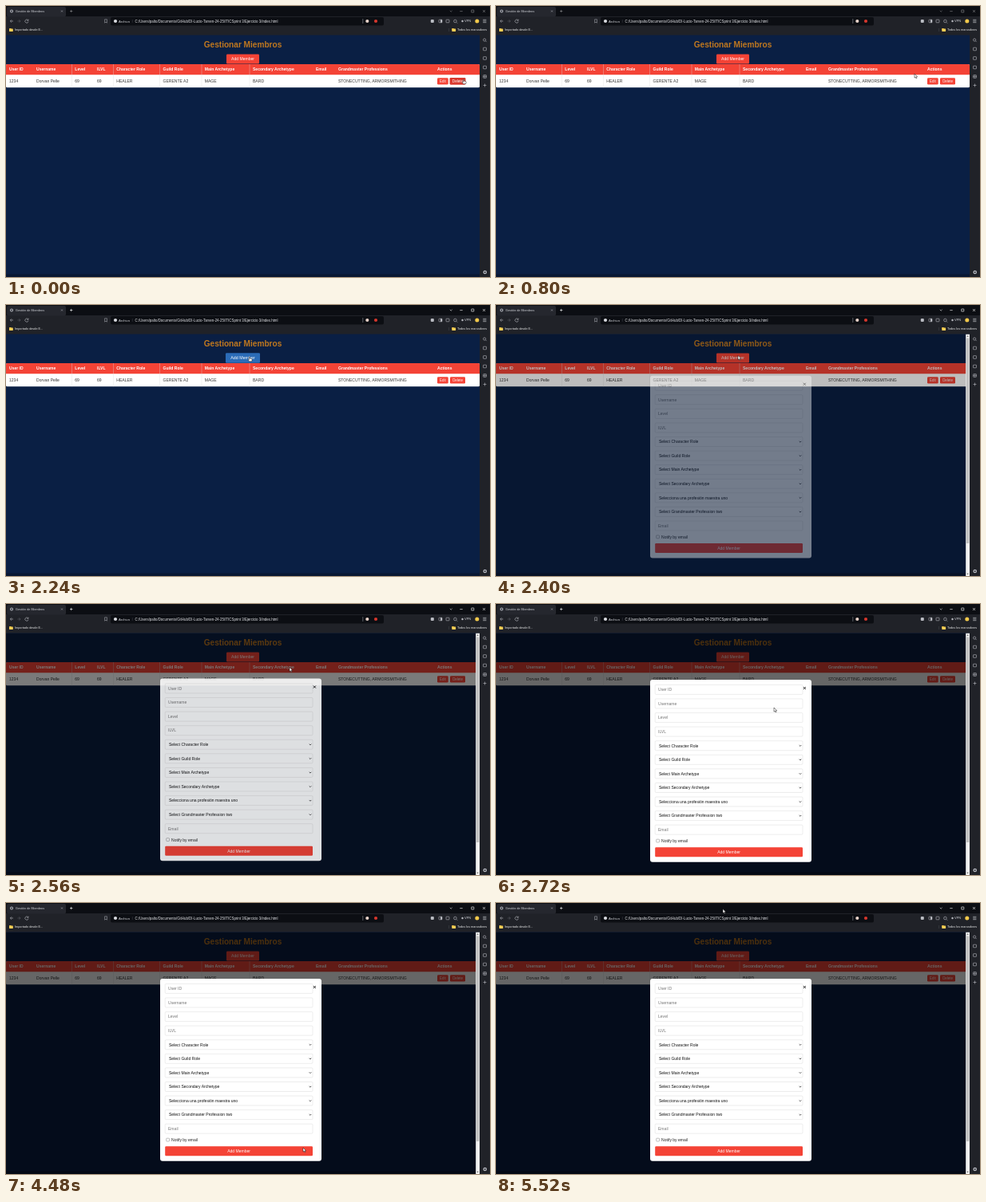
Recreate the animation shown at these times as an HTML page. Size 606 by 340 pixels, loop 5.6 s.

```html
<!DOCTYPE html>
<html lang="es">
<head>
<meta charset="utf-8">
<title>Gestión de Miembros</title>
<style>
  html, body { margin: 0; width: 100%; height: 100%; overflow: hidden; background: #0a1f44; }
  svg { display: block; width: 606px; height: 340px; font: 5.05px "Liberation Sans", Arial, sans-serif; }
  text { white-space: pre; }
</style>
</head>
<body>
<svg id="stage" viewBox="0 0 606 340"></svg>
<script>
const LOOP = 5600, STEP = 80, FOCUS = 2160, OPEN = 2280, OPEN_TIME = 420;
const RED = '#f44336';

const rect = (x, y, w, h, fill, extra = '') =>
  `<rect x="${x}" y="${y}" width="${w}" height="${h}" fill="${fill}" ${extra}/>`;
const dot = (x, y, r, fill) => `<circle cx="${x}" cy="${y}" r="${r}" fill="${fill}"/>`;
const line = (d, color = '#c8cad0', width = .6) =>
  `<path d="${d}" fill="none" stroke="${color}" stroke-width="${width}"/>`;
// Text is placed by its vertical centre.
const text = (s, x, y, fill, size = 5.05, extra = '') =>
  `<text x="${x}" y="${y + size * .36}" fill="${fill}" font-size="${size}" ${extra}>${s}</text>`;
const MID = 'text-anchor="middle"', BOLD = 'font-weight="bold"';

function button(id, label, x, y, w, h, size) {
  return `<g id="${id}">${rect(x, y, w, h, RED, 'rx="1.3"')}
    ${text(label, x + w / 2, y + h / 2, '#fff', size, MID)}</g>`;
}

function folder(x) {
  return rect(x, 28, 2.4, 2, '#e9b93a', 'rx=".4"') + rect(x, 28.6, 4.8, 3.4, '#f7cf55', 'rx=".4"');
}

function browser() {
  const icon = '#b9bbc2';
  const squares = [[544, 19], [553, 19], [599.5, 54], [599.5, 65.5], [599.5, 77], [599.5, 88.5]];
  return rect(0, 0, 606, 13, '#0c0e13') + rect(0, 13, 606, 23.5, '#202228') +
    rect(593, 36, 13, 304, '#202228') +
    rect(1, 1, 74, 12.5, '#25272e', 'rx="2"') +
    dot(7, 6.5, 2, '#aeb1b8') + dot(7, 6.5, .9, '#25272e') +
    text('Gestión de Miembros', 12, 6.5, '#d5d7dc', 3.8) +
    line('M69 5.5l2 2m0-2l-2 2', icon, .5) +
    `<g id="controls">${line('M80 6.5h3.4M81.7 4.8v3.4M555.8 5.8l1.4 1.4 1.4-1.4M568.3 6.6h3.4M582.8 5h3v3h-3zM597 5l3 3m0-3l-3 3', '#fff', .6)}</g>` +
    line('M9 19H5.4m1.6-1.7L5.3 19 7 20.7', icon) +
    line('M14.5 19H18m-1.6-1.7L18.1 19l-1.7 1.7', '#5c5f67') +
    line('M27.6 17.8a2.1 2.1 0 1 0 .4 1.8M28 16.6v1.7h-1.7', icon) +
    line('M123.6 16.8h2.8v4.4l-1.4-1.1-1.4 1.1z', icon, .5) +
    rect(131, 14, 342, 10.4, '#0c0e13', 'rx="2"') +
    dot(137, 19, 2.1, '#d8dadf') +
    text('Archivo', 141, 19, '#d8dadf', 4.2) + line('M158.3 17v4', '#4b4e56', .4) +
    text('C:/Users/palto/Documents/GitHub/DI-Lucio-Tarven-24-25/ITICSprint 3/Ejercicio 3/index.html',
      161.5, 19, '#e4e5e9', 4.42) +
    line('M446.8 16v6', '#a5a8af', .5) + dot(452.3, 19, 2.1, '#e9d3ca') + dot(463, 19, 2.1, '#d6372d') +
    rect(531.8, 17, 4, 4, icon, 'rx="1"') +
    squares.map(([x, y]) => rect(x - 2, y - 1.8, 4, 3.6, 'none', `rx=".5" stroke="${icon}" stroke-width=".6"`)).join('') +
    rect(544, 17.2, 2, 3.6, icon) + line('M599.5 86.7v3.6M597.5 88.5h4', icon, .5) +
    line('M564 20.5l1.2 1.2M560.6 19a1.8 1.8 0 1 0 3.6 0a1.8 1.8 0 1 0-3.6 0', icon) +
    dot(571.5, 19, 1.2, icon) + text('VPN', 574, 19, '#d5d7dc', 4) +
    dot(589.8, 19, 2.5, '#f2c94b') + line('M597.2 17.3h4.2M597.2 19h4.2M597.2 20.7h4.2', '#d5d7dc') +
    folder(4) + text('Importado desde E...', 11, 30, '#eceded', 3.8) +
    line('M554.5 28v4', '#4b4e56', .4) +
    folder(558.3) + text('Todos los marcadores', 565, 30, '#eceded', 3.8) +
    line('M597.5 42.5a1.6 1.6 0 1 0 3.2 0a1.6 1.6 0 1 0-3.2 0m2.8 1.2l1.4 1.4', icon) +
    line('M597.5 99.5h4m-2-2v4', icon) +
    dot(599.7, 334, 2.3, icon) + dot(599.7, 334, 1, '#202228');
}

function page() {
  const columns = [
    ['User ID', 4, '1234'], ['Username', 38, 'Dorvan Pelle'], ['Level', 86.3, '69'], ['ILVL', 114, '69'],
    ['Character Role', 138.3, 'HEALER'], ['Guild Role', 196.5, 'GERENTE A2'],
    ['Main Archetype', 248.8, 'MAGE'], ['Secondary Archetype', 309, 'BARD'], ['Email', 388, ''],
    ['Grandmaster Professions', 416, 'STONECUTTING, ARMORSMITHING'], ['Actions', 540, '']
  ];
  return rect(0, 36.5, 593, 303.5, '#0a1f44') + rect(0, 336.5, 593, 3.5, '#081733') +
    text('Gestionar Miembros', 296.5, 48.3, '#c0781f', 10.1, `${MID} ${BOLD}`) +
    button('add', 'Add Member', 276, 60.5, 41, 12, 5.05) +
    rect(0, 73, 593, 29.3, '#fff', 'rx="1.6"') +
    `<path d="M0 86.3V74.6q0-1.6 1.6-1.6H591.4q1.6 0 1.6 1.6V86.3z" fill="${RED}"/>` +
    line('M82.5 73v29.3M134.5 73v29.3M192.5 73v29.3M245 73v29.3M305 73v29.3', '#ddd', .35) +
    columns.map(([head, x, value]) =>
      text(head, x, 79.3, '#fff', 5.05, BOLD) + text(value, x, 94.3, '#333')).join('') +
    button('edit', 'Edit', 540, 90.2, 13.7, 8.3, 4.42) +
    button('delete', 'Delete', 556, 90.2, 19, 8.3, 4.42);
}

function dialog() {
  const fields = ['User ID', 'Username', 'Level', 'ILVL', 'Select Character Role', 'Select Guild Role',
    'Select Main Archetype', 'Select Secondary Archetype', 'Selecciona una profesión maestra uno',
    'Select Grandmaster Profession two', 'Email'];
  return rect(193, 95, 202, 228.7, '#fff', 'rx="3"') +
    fields.map((label, i) => {
      const y = 107.4 + i * 17.58, select = i > 3 && i < 10;
      return rect(199.2, y - 6, 184.8, 12, '#fff', 'rx="1.2" stroke="#ccc" stroke-width=".35"') +
        text(label, select ? 204 : 203, y, select ? '#111' : '#757575') +
        (select ? line(`M379.7 ${y - .6}l1.3 1.3 1.3-1.3`, '#111', .7) : '');
    }).join('') +
    line('M384.9 104l3 3m0-3l-3 3', '#111', .95) +
    rect(200.7, 295.2, 3.8, 3.8, '#fff', 'rx=".7" stroke="#666" stroke-width=".4"') +
    text('Notify by email', 207, 297.2, '#222') +
    button('submit', 'Add Member', 199.2, 305.2, 184.8, 12, 5.05);
}

const $ = id => document.getElementById(id);
$('stage').innerHTML = page() +
  `<g id="modal">
    ${rect(0, 36.5, 593, 303.5, '#000', 'id="shade"')}
    ${rect(588.2, 36.5, 4.8, 303.5, '#f1f1f1')}${rect(588.8, 41.5, 3.6, 257.5, '#c1c1c1')}
    <path d="M589.4 39.8l1.2-1.5 1.2 1.5zM589.4 336.8l1.2 1.5 1.2-1.5z" fill="#555"/>
    <g id="dialog">${dialog()}</g>
  </g>` + browser() +
  `<g id="cursor" fill="#fff" stroke="#000" stroke-width=".45" stroke-linejoin="round">
    <path id="arrow" d="M0 0V5.2L1.2 4.1 2 5.9 2.9 5.5 2.1 3.8H3.7Z"/>
    <path id="hand" d="M-.6 .3Q0-.4.6 .3V2.2L2.6 2.6Q3.3 2.8 3.2 3.6L2.7 5.7H-.5L-2 3.6Q-1.8 2.8-.6 3.5Z"/>
  </g>`;

// Pointer path: time, x, y
const path = [
  [0, 573, 92], [160, 572, 93], [480, 560, 95], [640, 544, 92], [800, 524, 85], [1040, 430, 79],
  [1280, 341, 78], [1520, 324, 72], [1840, 312, 67], [2240, 305, 65], [2400, 303, 63.5],
  [2560, 355, 79.5], [2720, 348, 130], [3040, 230, 215], [3520, 162, 237.5], [3680, 270, 290],
  [3840, 440, 328], [4000, 454, 310], [4240, 420, 306], [4480, 372, 307], [4640, 366, 285],
  [4880, 348, 160], [5120, 327, 60], [5360, 303, 22], [5520, 284, 7.5]
];

function pointer(t) {
  const last = path.length - 1;
  let i = path.findIndex(p => p[0] > t) - 1;
  if (i < 0) return path[last].slice(1);
  const a = path[i], b = path[i + 1], before = path[Math.max(0, i - 1)], after = path[Math.min(last, i + 2)];
  const span = b[0] - a[0], u = (t - a[0]) / span;
  return [1, 2].map(k => {
    const m = (b[k] - before[k]) / (b[0] - before[0]) * span;
    const n = (after[k] - a[k]) / (after[0] - a[0]) * span;
    return a[k] + u * (m + u * (3 * (b[k] - a[k]) - 2 * m - n + u * (2 * (a[k] - b[k]) + m + n)));
  });
}

function hover(id, over, color, x, y) {
  $(id).setAttribute('transform', over ? `translate(${x} ${y}) scale(1.05) translate(${-x} ${-y})` : '');
  $(id).firstChild.setAttribute('fill', over ? color : RED);
}

function draw(now) {
  const t = Math.floor(now % LOOP / STEP) * STEP;
  const [x, y] = pointer(t);
  const open = t > OPEN;
  const p = open ? Math.sin(Math.min(1, (t - OPEN) / OPEN_TIME) * Math.PI / 2) : 0;
  const inside = (l, r, top, bottom) => !open && x > l && x < r && y > top && y < bottom;
  const onAdd = inside(276, 317, 60.5, 72.5);
  const onEdit = inside(540, 553.7, 90, 98.5), onDelete = inside(556, 575, 90, 98.5);

  hover('add', onAdd, '#2b6cb8', 296.5, 66.5);
  hover('edit', onEdit, '#d93a2f', 546.8, 94.3);
  hover('delete', onDelete, '#d93a2f', 565.5, 94.3);
  $('controls').setAttribute('opacity', t < FOCUS ? .5 : 1);
  $('modal').style.display = open ? '' : 'none';
  $('shade').setAttribute('opacity', .6 * p);
  $('dialog').setAttribute('opacity', p);
  $('dialog').setAttribute('transform', `translate(0 ${-11 * (1 - p)})`);

  const hand = onAdd || onEdit || onDelete;
  $('hand').style.display = hand ? '' : 'none';
  $('arrow').style.display = hand ? 'none' : '';
  $('cursor').setAttribute('transform', `translate(${x} ${y})`);
}

const start = performance.now();
(function tick() {
  draw(performance.now() - start);
  requestAnimationFrame(tick);
})();
</script>
</body>
</html>
```
